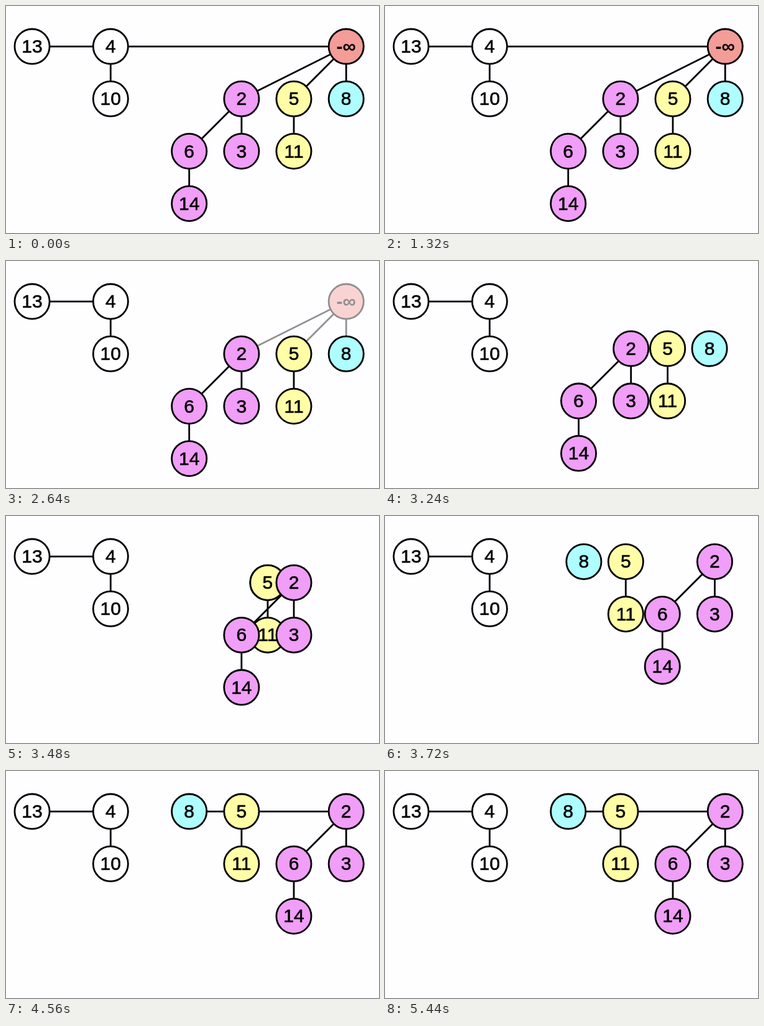
An HTML page that plays this animation: 600x365 px, repeating every 6.32 s.

```html
<!DOCTYPE html>
<html lang="en">
<head>
<meta charset="utf-8">
<title>Heap: extract minimum</title>
<style>
html, body { margin: 0; width: 100%; height: 100%; overflow: hidden; background: #fefdff; }
svg { display: block; }
line, circle { stroke: #000; stroke-width: 2.8; }
text {
  font: 30px "Liberation Sans", Arial, sans-serif;
  text-anchor: middle;
  stroke: #000;
  stroke-width: 0.6;
}
.root text { font-weight: bold; stroke: none; }
</style>
</head>
<body>
<svg id="stage" width="600" height="365" viewBox="0 0 600 365"></svg>
<script>
const LOOP = 6320, STEP = 40;
const GAP = 84.2, TOP = 65.1;
const COL = [42, 168.3, 294.7, 378.9, 463, 547.2];
const stage = document.getElementById("stage");

function add(parent, tag, attrs = {}, text = "") {
  const el = document.createElementNS("http://www.w3.org/2000/svg", tag);
  for (const key in attrs) el.setAttribute(key, attrs[key]);
  el.textContent = text;
  return parent.appendChild(el);
}

const group = (attrs) => add(stage, "g", attrs);
const rowY = row => TOP + row * GAP;

function edge(parent, c1, r1, c2, r2) {
  add(parent, "line", { x1: COL[c1], y1: rowY(r1), x2: COL[c2], y2: rowY(r2) });
}

function node(parent, col, row, label, fill) {
  const x = COL[col], y = rowY(row);
  add(parent, "circle", { cx: x, cy: y, r: 28.1, fill });
  add(parent, "text", { x, y: y + 10 }, label);
}

// Edges that fade sit behind every node.
const rootLink = group();
edge(rootLink, 1, 0, 5, 0);
const newLinks = group();
edge(newLinks, 2, 0, 5, 0);

const root = group({ class: "root" });
edge(root, 5, 0, 3, 1);
edge(root, 5, 0, 4, 1);
edge(root, 5, 0, 5, 1);
node(root, 5, 0, "-∞", "#f39c98");

const list = group();
edge(list, 0, 0, 1, 0);
edge(list, 1, 0, 1, 1);
node(list, 0, 0, "13", "#fff");
node(list, 1, 0, "4", "#fff");
node(list, 1, 1, "10", "#fff");

const cyan = group();
node(cyan, 5, 1, "8", "#aefdff");

const yellow = group(), YELLOW = "#fffda6";
edge(yellow, 4, 1, 4, 2);
node(yellow, 4, 1, "5", YELLOW);
node(yellow, 4, 2, "11", YELLOW);

const pink = group(), PINK = "#f09ef7";
edge(pink, 3, 1, 2, 2);
edge(pink, 3, 1, 3, 2);
edge(pink, 2, 2, 2, 3);
node(pink, 3, 1, "2", PINK);
node(pink, 2, 2, "6", PINK);
node(pink, 3, 2, "3", PINK);
node(pink, 2, 3, "14", PINK);

// Each subtree moves up one row into the root list.
const moves = [[cyan, COL[2] - COL[5]], [yellow, COL[3] - COL[4]], [pink, COL[5] - COL[3]]];

const ramp = (t, from, to) => Math.min(1, Math.max(0, (t - from) / (to - from)));
const ease = u => (1 - Math.cos(Math.PI * u)) / 2;

function draw(t) {
  rootLink.setAttribute("opacity", 1 - ramp(t, 1500, 2020));
  root.setAttribute("opacity", 1 - ramp(t, 2360, 2850));
  newLinks.setAttribute("opacity", ramp(t, 4080, 4360));
  const u = ease(ramp(t, 3074, 3886));
  for (const [tree, dx] of moves) {
    tree.setAttribute("transform", `translate(${dx * u} ${-GAP * u})`);
  }
}

const start = performance.now();
function tick() {
  const t = (performance.now() - start) % LOOP;
  draw(Math.floor(t / STEP) * STEP);
  requestAnimationFrame(tick);
}
tick();
</script>
</body>
</html>
```
